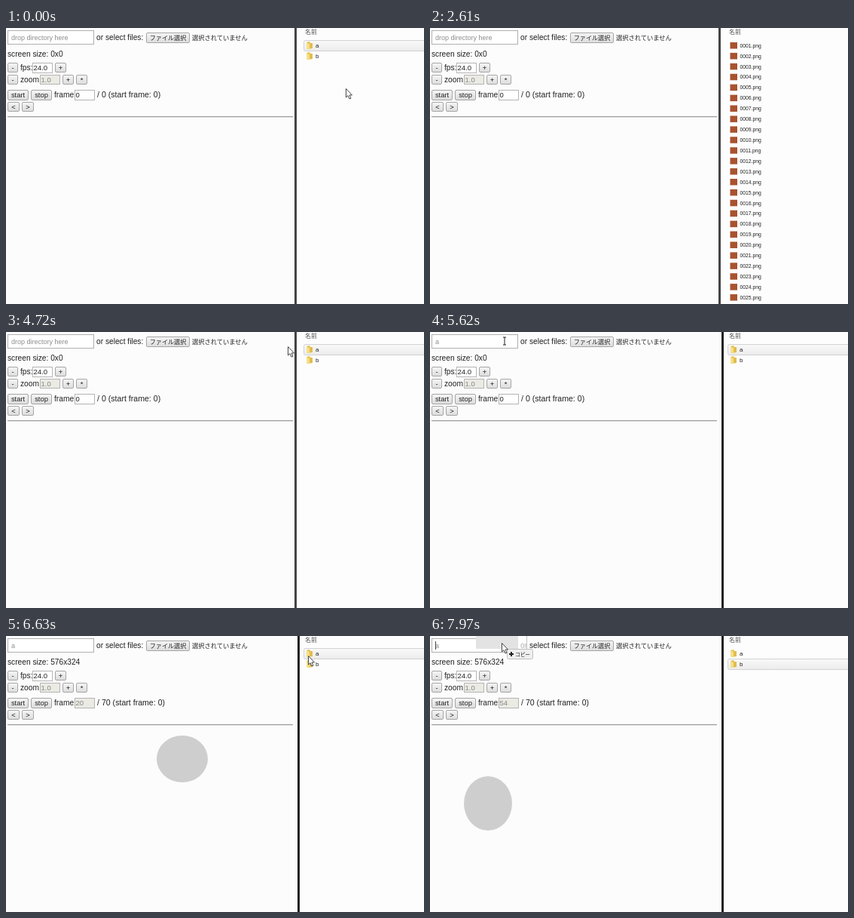
These frames come from a looping animation (555x366 px, 8000 ms). An HTML page:

```html
<!DOCTYPE html>
<html lang="ja">
<head>
<meta charset="utf-8">
<title>Frame player</title>
<style>
html, body { margin: 0; width: 100%; height: 100%; overflow: hidden; background: #fcfcfc; }
svg { display: block; width: 555px; height: 366px; }
text { font-family: "Liberation Sans", "Noto Sans CJK JP", "Noto Sans CJK", sans-serif; fill: #222; white-space: pre; }
.ja { font-family: "Noto Sans CJK JP", "Noto Sans CJK", sans-serif; }
</style>
</head>
<body>
<svg id="stage" viewBox="0 0 555 366">
  <defs>
    <linearGradient id="face" x2="0" y2="1"><stop stop-color="#f6f6f6"/><stop offset="1" stop-color="#dcdcdc"/></linearGradient>
    <linearGradient id="glow" x2="0" y2="1"><stop stop-color="#f9f9f9"/><stop offset="1" stop-color="#ececec"/></linearGradient>
  </defs>
  <rect width="555" height="366" fill="#fcfcfc"/>
</svg>
<script>
const LOOP = 8000;
const stage = document.getElementById('stage');

function add(tag, attrs, parent = stage) {
  const node = document.createElementNS('http://www.w3.org/2000/svg', tag);
  for (const key in attrs) node.setAttribute(key, attrs[key]);
  parent.appendChild(node);
  return node;
}
function set(node, attrs) {
  for (const key in attrs) node.setAttribute(key, attrs[key]);
}
function show(node, on) {
  node.setAttribute('visibility', on ? 'visible' : 'hidden');
}
function label(str, x, y, size = 10.2, attrs = {}, parent = stage) {
  const node = add('text', { x, y, 'font-size': size, ...attrs }, parent);
  node.textContent = str;
  return node;
}
function box(x, y, w, h, attrs, parent = stage) {
  return add('rect', { x: x + .5, y: y + .5, width: w - 1, height: h - 1, ...attrs }, parent);
}
function button(str, x, y, w, h = 13, size = 9.4, cls = '') {
  box(x, y, w, h, { rx: 1.5, fill: 'url(#face)', stroke: '#a6a6a6' });
  label(str, x + w / 2, y + h / 2 + 3.2, size, { 'text-anchor': 'middle', class: cls });
}
function field(str, x, y, w, h, off) {
  const frame = box(x, y, w, h, { fill: '#fff', stroke: '#b4b4b4' });
  const value = label(str, x + 1.5, y + h / 2 + 3.3, 9.5);
  const enable = on => {
    set(frame, { fill: on ? '#fff' : '#ebebe4' });
    value.style.fill = on ? '#222' : '#858585';
  };
  enable(!off);
  return { value, enable };
}

// Player page
box(2, 3, 115, 19, { fill: '#fff', stroke: '#b0b0b0' });
const drop = label('', 7, 16, 9);
drop.style.fill = '#8c8c8c';
const caret = add('path', { d: 'M7.5 7v11', stroke: '#444' });
label('or select files:', 120, 16);
button('ファイル選択', 186, 6, 58, 14, 8.1, 'ja');
label('選択されていません', 247, 16, 8.25, { class: 'ja' });
const size = label('', 2, 38);
button('-', 2, 46, 14);
label('fps:', 19, 56);
field('24.0', 35, 46, 27, 14);
button('+', 65, 46, 15);
button('-', 2, 62, 14);
label('zoom:', 19, 71.5);
field('1.0', 45, 62, 27, 13, true);
button('+', 75, 62, 15);
button('*', 93, 62, 15);
button('start', 2, 82, 28, 14);
button('stop', 33, 82, 28, 14);
label('frame:', 64, 92);
const counter = field('0', 91, 82, 27, 14);
const total = label('', 121, 92, 10.6);
button('<', 2, 98, 16, 13);
button('>', 21, 98, 16, 13);
add('path', { d: 'M2 117.5H381', stroke: '#9c9c9c' });
add('path', { d: 'M2 118.5H381', stroke: '#e2e2e2' });
const model = add('ellipse', { fill: '#cecece' });

// File browser
const pane = add('rect', { y: 0, width: 180, height: 366, fill: '#fdfdfd' });
const splitter = add('rect', { y: 0, width: 3, height: 366 });
label('名前', 397, 8, 8, { class: 'ja' }).style.fill = '#555';
const hover = box(395, 16, 170, 15, { rx: 2, fill: 'url(#glow)', stroke: '#d2d2d2' });
const folders = add('g', {});
['a', 'b'].forEach((name, i) => {
  const g = add('g', { transform: `translate(398 ${18 + i * 14})` }, folders);
  add('path', { d: 'M1 1 5 0 6 2 9 2V9L2 10Z', fill: '#e3bd4b' }, g);
  add('path', { d: 'M1 1 5 3V10.5L1 9Z', fill: '#f5df8c' }, g);
  label(name, 13, 8, 8, {}, g);
});
const files = add('g', {});
for (let i = 0; i < 25; i++) {
  const y = 23 + i * 13.92;
  add('rect', { x: 398.5, y: y - 4, width: 9.5, height: 8.5, fill: '#a8532f' }, files);
  label(String(i + 1).padStart(4, '0') + '.png', 411.5, y + 2.7, 6.8, {}, files);
}

// Pointer, with the dragged item below it
const ghost = add('g', {});
add('rect', { x: -34, y: -9, width: 56, height: 17, fill: '#e3e3e3' }, ghost);
add('rect', { x: 22, y: -9, width: 12, height: 16, fill: '#fff', opacity: .65 }, ghost);
add('path', { d: 'M33.5 -9V8', stroke: '#c4c4c4' }, ghost);
box(7, 8, 35, 14, { rx: 2, fill: '#efefef', stroke: '#c0c0c0' }, ghost);
add('path', { d: 'M10 15h6M13 12v6', stroke: '#222', 'stroke-width': 2 }, ghost);
label('コピー', 18, 17.5, 6.7, { class: 'ja' }, ghost);
const arrow = add('path', { d: 'M.5 .5V12L3 9.6 5 14 7 13.2 5 9H8.5Z', fill: '#fff', stroke: '#333', 'stroke-width': .9 });
const beam = add('path', { d: 'M-2 -5H2M-2 5H2M0 -5V5', stroke: '#222' });

// Keys: time, x, y
const pointerKeys = [
  [370, 451, 80], [1000, 419, 57], [1170, 423, 54], [1440, 402, 20], [1620, 402, 20],
  [1890, 405, 22], [3730, 421, 76], [4446, 403, 22], [4620, 403, 22], [4713, 374, 19],
  [5437, 95, 10], [5527, 99, 12], [5618, 99, 12], [6251, 385, 22], [6613, 401, 26],
  [6800, 405, 36], [7060, 404, 37], [7246, 351, 45], [7970, 95, 9]
];
// Keys: frame, centre x, centre y, radius x, radius y
const modelKeys = [
  [0, 285, 225, 34, 31], [10, 268, 184, 34, 31], [20, 234, 163, 34, 31], [30, 210, 226, 34, 30],
  [35, 176, 266, 35, 28], [43, 125, 280, 35, 32], [54, 77, 222, 32, 36]
];

function at(keys, t) {
  if (t <= keys[0][0]) return keys[0].slice(1);
  for (let i = 1; i < keys.length; i++) {
    const a = keys[i - 1], b = keys[i];
    if (t < b[0]) {
      const k = (t - a[0]) / (b[0] - a[0]);
      return a.slice(1).map((v, j) => v + (b[j + 1] - v) * k);
    }
  }
  return keys[keys.length - 1].slice(1);
}
const within = (t, a, b) => t >= a && t < b;

function draw(t) {
  const step = 370 + 90.48 * Math.floor((t - 345) / 90.48);
  const loaded = t >= 5530, sized = t >= 5700, playing = t >= 5795;
  const listing = within(t, 2070, 3640);

  const [px, py] = at(pointerKeys, step);
  const place = { transform: `translate(${px.toFixed(1)} ${py.toFixed(1)})` };
  const dragging = within(t, 4620, 5530) || t >= 7080;
  const overDrop = px < 150 && py < 24;
  const visible = !within(t, 2600, 3815);
  const typing = overDrop && !dragging && px < 117;
  [ghost, arrow, beam].forEach(node => set(node, place));
  show(ghost, dragging && overDrop);
  show(arrow, visible && !typing);
  show(beam, visible && typing);
  show(caret, loaded && dragging && overDrop);

  drop.textContent = loaded ? 'a' : 'drop directory here';
  size.textContent = 'screen size: ' + (sized ? '576x324' : '0x0');
  total.textContent = `/ ${sized ? 70 : 0} (start frame: 0)`;
  const frame = playing ? Math.max(0, Math.floor((step - 5814) * .0251)) : 0;
  counter.value.textContent = frame;
  counter.enable(!playing);
  const [cx, cy, rx, ry] = at(modelKeys, frame);
  set(model, { cx, cy, rx, ry });
  show(model, sized);

  set(pane, { x: loaded ? 387 : 383 });
  set(splitter, { x: loaded ? 387 : 383, fill: loaded ? '#222' : '#444' });
  show(files, listing);
  show(folders, !listing);
  show(hover, !within(t, 2520, 3640));
  set(hover, { y: t >= 6790 ? 30.5 : 16.5 });
}

function tick() {
  draw(performance.now() % LOOP);
  requestAnimationFrame(tick);
}
tick();
</script>
</body>
</html>
```
